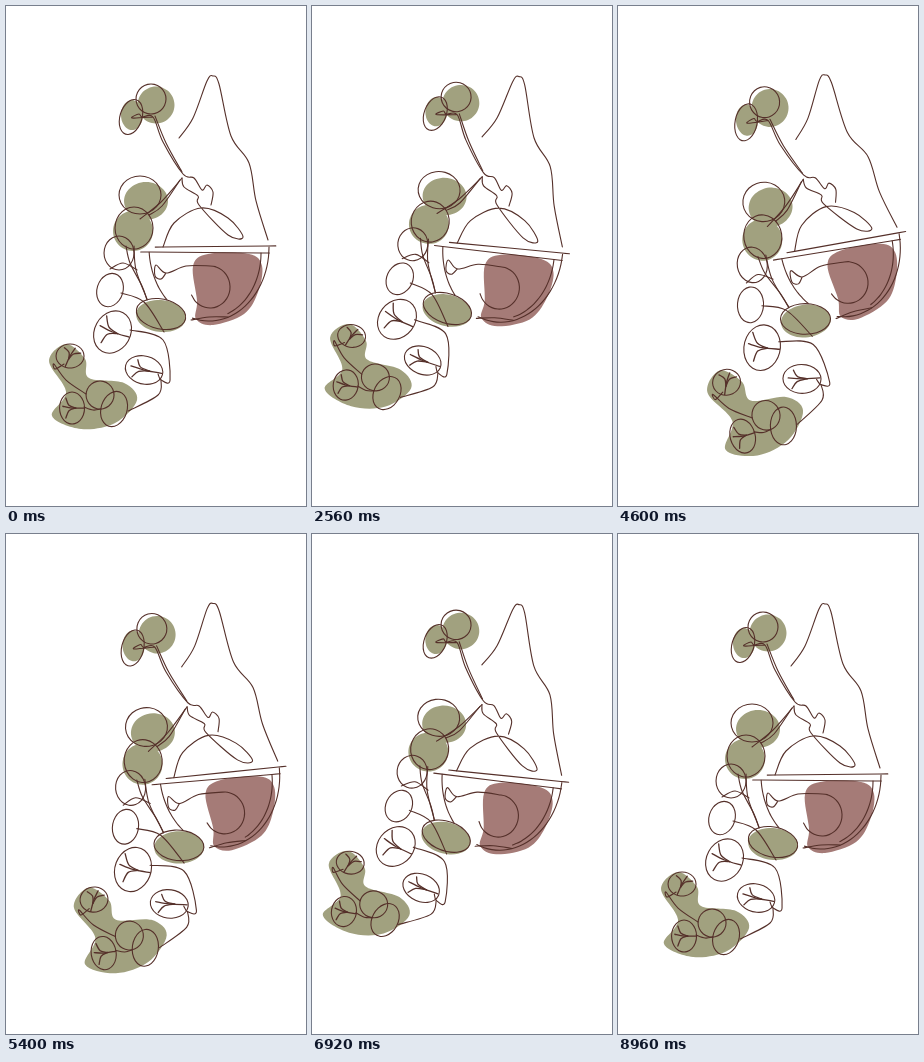
Animation, 300 px wide and 500 px high, one loop 9000 ms. Source, as an HTML page with a canvas:

```html
<!DOCTYPE html>
<html lang="en">
<head>
<meta charset="utf-8">
<title>Swaying line drawing</title>
<style>
html, body { margin: 0; width: 100%; height: 100%; overflow: hidden; background: #fff; }
canvas { display: block; }
</style>
</head>
<body>
<canvas width="300" height="500"></canvas>
<script>
const ctx = document.querySelector('canvas').getContext('2d');
const { PI, sin, cos, abs, max, min } = Math;
const LOOP = 9000, STEP = 40;
const INK = '#55302a', OLIVE = '#a1a17f', WINE = '#a57b77';

const fills = [], lines = [];
const path = s => s.split(' ').map(p => p.split(',').map(Number));

function arc(cx, cy, rx, ry, from, to, tilt = 0) {
  const n = 14;
  return Array.from({ length: n + 1 }, (_, i) => {
    const a = from + (to - from) * i / n;
    const x = rx * cos(a), y = ry * sin(a);
    return [cx + x * cos(tilt) - y * sin(tilt), cy + x * sin(tilt) + y * cos(tilt)];
  });
}
const oval = (cx, cy, rx, ry = rx, tilt = 0) => arc(cx, cy, rx, ry, 0, 2 * PI, tilt).slice(1);

const fill = (color, points) => fills.push({ color, points, closed: true });
const line = (points, closed = false, width = 1.1) => lines.push({ points, closed, width });
const leaf = (...shape) => line(oval(...shape), true);

// A leaf with a midrib pointing along dir and two side veins.
function veinedLeaf(cx, cy, rx, ry, tilt, dir) {
  leaf(cx, cy, rx, ry, tilt);
  const tip = (angle, k) => [cx + k * rx * cos(angle), cy + k * ry * sin(angle)];
  line([tip(dir, -.95), [cx, cy], tip(dir + .15, .75)], false, 1.3);
  for (const side of [-1, 1]) {
    line([tip(dir, -.3), tip(dir + side * .6, .3), tip(dir + side * .9, .8)], false, 1.3);
  }
}

// Colour patches
fill(OLIVE, oval(150, 99, 18.5));
fill(OLIVE, oval(126, 109, 11, 15));
fill(OLIVE, oval(140, 195, 22, 19));
fill(OLIVE, oval(127, 225, 20));
fill(OLIVE, oval(155, 310, 25, 16, .1));
fill(OLIVE, path('43,355 60,338 79,353 83,372 118,377 131,394 109,417 75,423 46,410 60,386'));
fill(WINE, path('187,260 202,248 243,248 256,260 252,286 238,308 207,319 190,313 191,295'));

// Flower, its stem and the hand holding it
leaf(145, 93, 15);
leaf(125, 111, 11, 18, .3);
line(path('147,111 126,112 133,108 136,111 147,111 157,136 177,168 188,172 196,184 201,179 207,186 205,199'));
line(path('149,110 160,137 176,166'));

// Hood, face and shoulder
line(path('173,132 187,112 201,75 207,70 213,78 225,130 243,157 250,195 262,234'));
line(path('157,241 168,217 195,202 222,212 237,231 222,229 193,199 192,190 178,181 176,172'));

// Bowl and cup
line(path('157,241 157,241 262,240 262,240'));
line(arc(203, 241, 60, 74, 0, 1.85));
line(arc(203, 241, 60, 74, 2.35, PI - .07));
line(path('143,246 143,246 255,247 255,247'));
line(arc(203, 247, 52, 65, 0, 1.2));
line(path('185,314 203,311 222,311'));
line([...path('160,267 155,273 149,270 150,259 160,267 180,260'), ...arc(204, 281, 20, 21, -PI / 2, 2.75)]);

// Hanging vine
leaf(134, 189, 21, 19);
leaf(128, 222, 19, 21);
leaf(113, 247, 15, 17);
leaf(104, 284, 13, 17, .3);
leaf(155, 308, 25, 15, .2);
line(path('176,172 155,196 134,213'));
line(path('174,174 156,200 143,209'));
line(path('120,240 124,257 136,280 141,294'));
line(path('128,240 130,264 141,293'));
line(path('104,263 117,257 131,264'));
line(path('115,287 138,296 158,326'));
veinedLeaf(106.5, 326, 18, 22, .5, PI + .25);
veinedLeaf(138, 364, 19, 14, .25, PI + .25);
line(path('124,324 157,334 164,374 155,374 152,368'));
line(path('155,374 152,389 122,405'));

// Lowest sprig
veinedLeaf(64, 350, 14, 12, 0, -1.2);
veinedLeaf(66, 402, 12.5, 16, 0, PI);
leaf(94, 389, 14);
leaf(108, 403, 13, 18, .3);
line(path('58,358 49,363 48,358 60,374 80,388'));
line(path('78,401 87,404 95,403'));

// Bend amounts: rest, left, far right, left, rest.
const smooth = u => u * u * (3 - 2 * u);
const sways = [
  { end: 2980, to: -.77, ease: u => u ** 1.7 },
  { end: 4620, to: .95, ease: smooth },
  { end: 6920, to: -.63, ease: smooth },
  { end: LOOP, to: 0, ease: smooth }
];

function bendAt(t) {
  let start = 0, from = 0;
  for (const { end, to, ease } of sways) {
    if (t < end) return from + (to - from) * ease((t - start) / (end - start));
    start = end;
    from = to;
  }
  return 0;
}

// Bends the drawing along a vertical spine whose angle grows downwards.
function bender(bend) {
  const k = abs(bend) < .001 ? .001 : bend;
  const spine = 190, top = 70, base = .06 * k, curl = .00068 * k;
  return ([x, y]) => {
    const a = base + curl * (y - top), side = x - spine;
    return [
      spine + (cos(base) - cos(a)) / curl + side * cos(a),
      top + (sin(a) - sin(base)) / curl - side * sin(a)
    ];
  };
}

// Smooth curve through the points
function trace(points, closed) {
  const n = points.length;
  const at = i => points[closed ? (i + n) % n : max(0, min(n - 1, i))];
  ctx.beginPath();
  ctx.moveTo(...points[0]);
  for (let i = 0; i < (closed ? n : n - 1); i++) {
    const [a, b, c, d] = [at(i - 1), at(i), at(i + 1), at(i + 2)];
    ctx.bezierCurveTo(
      b[0] + (c[0] - a[0]) / 6, b[1] + (c[1] - a[1]) / 6,
      c[0] - (d[0] - b[0]) / 6, c[1] - (d[1] - b[1]) / 6, c[0], c[1]);
  }
}

function draw(t) {
  const warp = bender(bendAt(t));
  ctx.clearRect(0, 0, 300, 500);
  for (const { color, points, closed } of fills) {
    ctx.fillStyle = color;
    trace(points.map(warp), closed);
    ctx.fill();
  }
  ctx.strokeStyle = INK;
  ctx.lineCap = ctx.lineJoin = 'round';
  for (const { points, closed, width } of lines) {
    ctx.lineWidth = width;
    trace(points.map(warp), closed);
    ctx.stroke();
  }
}

const start = performance.now();
function frame() {
  const t = (performance.now() - start) % LOOP;
  draw(t - t % STEP);
  requestAnimationFrame(frame);
}
frame();
</script>
</body>
</html>
```
